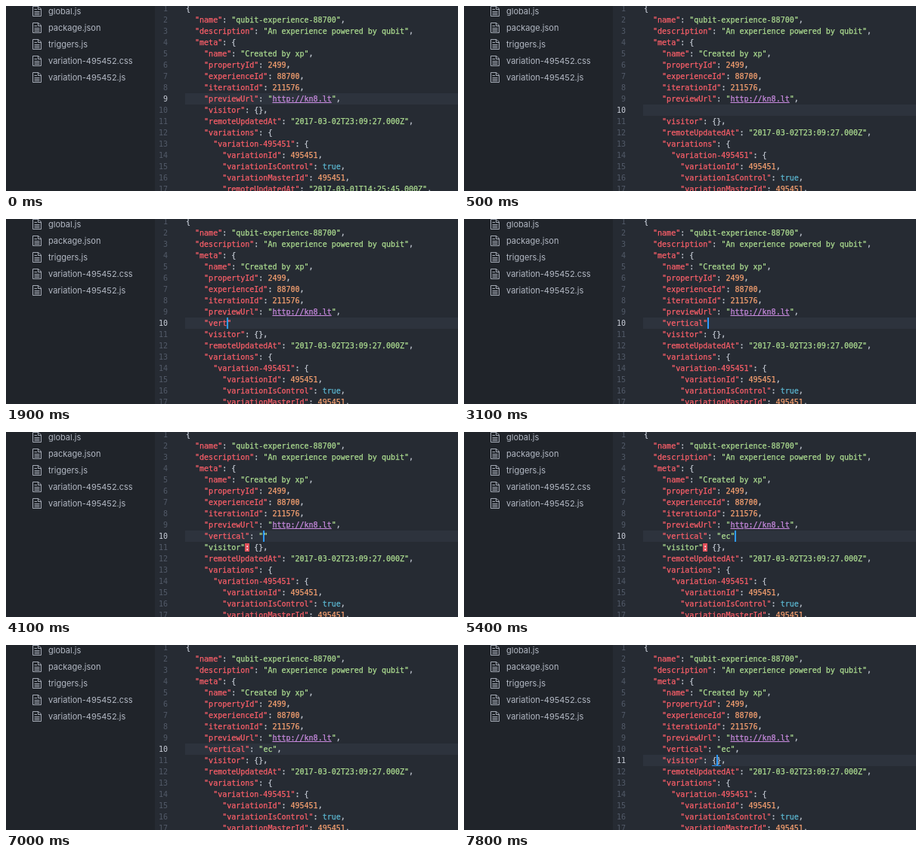
These frames come from a looping animation (598x246 px, 8 s). An HTML page:

```html
<!DOCTYPE html>
<html lang="en">
<head>
<meta charset="utf-8">
<title>Editing a JSON file</title>
<style>
  html, body { margin: 0; width: 100%; height: 100%; overflow: hidden; background: #262b33; }
  #stage { position: relative; width: 598px; height: 246px; overflow: hidden; }
  #files {
    position: absolute; left: 0; top: 0; width: 197px; height: 246px;
    background: #20242a; color: #b3b9c4;
    font: 11px/22px Inter, Roboto, sans-serif;
  }
  .file { position: absolute; left: 56px; white-space: pre; }
  .file svg { position: absolute; left: -21px; top: 4px; fill: none; stroke: #a4aab5; }
  #editor {
    position: absolute; left: 197px; top: 0; width: 401px; height: 246px;
    color: #c3c9d3; font: 10px/15px "DejaVu Sans Mono", "Liberation Mono", monospace;
  }
  .row { position: absolute; left: 0; width: 401px; height: 15px; white-space: pre; }
  .row.active { background: linear-gradient(#2d333d, #2d333d) 40px 0 no-repeat; }
  .num { position: absolute; left: 0; width: 17px; text-align: right; color: #525a68; }
  .active .num { color: #c9ced8; }
  .code { position: absolute; left: 41px; -webkit-text-stroke: .25px; }
  .key { color: #fb5f69; }
  .str { color: #acdc90; }
  .val { color: #f5a070; }
  .bool { color: #5cb8d2; }
  .url { color: #c98be0; text-decoration: underline; }
  .bad { color: #fff; background: #e2505a; }
  #cursor { position: absolute; width: 1.6px; height: 15px; background: #2f9bff; }
  .pair { position: absolute; width: 6px; height: 1px; background: #2f9bff; }
</style>
</head>
<body>
<div id="stage">
  <div id="files"></div>
  <div id="editor"></div>
</div>
<script>
const LOOP = 8000, CHAR = 6.02, ROW = 15, CODE_X = 41;
const BROKEN = [3300, 6200]; // while the value has no comma after it

const files = ['global.js', 'package.json', 'triggers.js', 'variation-495452.css', 'variation-495452.js'];
const source = `{
  "name": "qubit-experience-88700",
  "description": "An experience powered by qubit",
  "meta": {
    "name": "Created by xp",
    "propertyId": 2499,
    "experienceId": 88700,
    "iterationId": 211576,
    "previewUrl": "http://kn8.lt",
    "visitor": {},
    "remoteUpdatedAt": "2017-03-02T23:09:27.000Z",
    "variations": {
      "variation-495451": {
        "variationId": 495451,
        "variationIsControl": true,
        "variationMasterId": 495451,
        "remoteUpdatedAt": "2017-03-01T14:25:45.000Z",`.split('\n');

// time, text of the new line, cursor row, cursor column (-1 = hidden)
const steps = [
  [0, null, 9, -1],
  [100, '', 10, 0],
  [400, '', 10, -1],
  [800, '', 10, 0],
  [1100, '""', 10, 1],
  [1300, '"v"', 10, 2],
  [1400, '"ve"', 10, 3],
  [1600, '"ver"', 10, 4],
  [1900, '"vert"', 10, 5],
  [2000, '"verti"', 10, 6],
  [2300, '"vertic"', 10, 7],
  [2700, '"vertical"', 10, 9],
  [3100, '"vertical"', 10, 10],
  [3300, '"vertical":', 10, 11],
  [3600, '"vertical": ', 10, 12],
  [4100, '"vertical": ""', 10, 13],
  [4600, '"vertical": ""', 10, -1],
  [4900, '"vertical": "e"', 10, 14],
  [5200, '"vertical": "ec"', 10, 15],
  [5400, '"vertical": "ec"', 10, 16],
  [5800, '"vertical": "ec",', 10, 17],
  [6200, '"vertical": "ec",', 10, -1],
  [6600, '"vertical": "ec",', 10, 17],
  [7000, '"vertical": "ec",', 10, -1],
  [7100, '"vertical": "ec",', 11, 14],
  [7300, '"vertical": "ec",', 11, 13],
  [7800, '"vertical": "ec",', 11, 12]
];

const editor = document.getElementById('editor');
const rowTop = n => n * ROW - 19.5;
const colX = col => CODE_X + (col + 4) * CHAR;
const span = (name, text) => `<span class="${name}">${text}</span>`;

function paint(line, broken) {
  const invalid = broken && line.includes('"visitor"');
  return line.replace(/"[^"]*"|\b\d+\b|\btrue\b|:/g, (token, at) => {
    if (token === ':') return invalid ? span('bad', token) : token;
    if (token === 'true') return span('bool', token);
    if (token[0] !== '"') return span('val', token);
    if (token.startsWith('"http'))
      return span('str', '"') + span('url', token.slice(1, -1)) + span('str', '"');
    const isKey = !line.slice(0, at).trim() && !invalid;
    return span(isKey ? 'key' : 'str', token);
  });
}

function render([, text, row, col], broken) {
  const lines = source.slice();
  if (text !== null) lines.splice(9, 0, '    ' + text);
  let html = lines.slice(0, 17).map((line, i) => {
    const n = i + 1;
    return `<div class="row${n === row ? ' active' : ''}" style="top:${rowTop(n)}px">` +
      span('num', n) + span('code', paint(line, broken)) + '</div>';
  }).join('');
  if (row === 11 && col < 14)
    for (const c of [11, 12])
      html += `<div class="pair" style="left:${colX(c)}px;top:${rowTop(12) - 1}px"></div>`;
  if (col >= 0)
    html += `<div id="cursor" style="left:${colX(col)}px;top:${rowTop(row)}px"></div>`;
  editor.innerHTML = html;
}

const icon = '<svg width="12" height="14"><path d="M.5 .5H8L11.5 4V13.5H.5Z' +
  'M7.5 .5V4.5H11.5M2.5 4.5H6M2.5 7.5H9.5M2.5 9.5H9.5M2.5 11.5H9.5"/></svg>';
document.getElementById('files').innerHTML = files.map((name, i) =>
  `<div class="file" style="top:${i * 22 - 4}px">${icon}${name}</div>`
).join('');

let shown = -1;
function tick() {
  const t = performance.now() % LOOP;
  const i = steps.findLastIndex(step => step[0] <= t);
  if (i !== shown) {
    shown = i;
    const at = steps[i][0];
    render(steps[i], at >= BROKEN[0] && at < BROKEN[1]);
  }
  requestAnimationFrame(tick);
}
tick();
</script>
</body>
</html>
```
